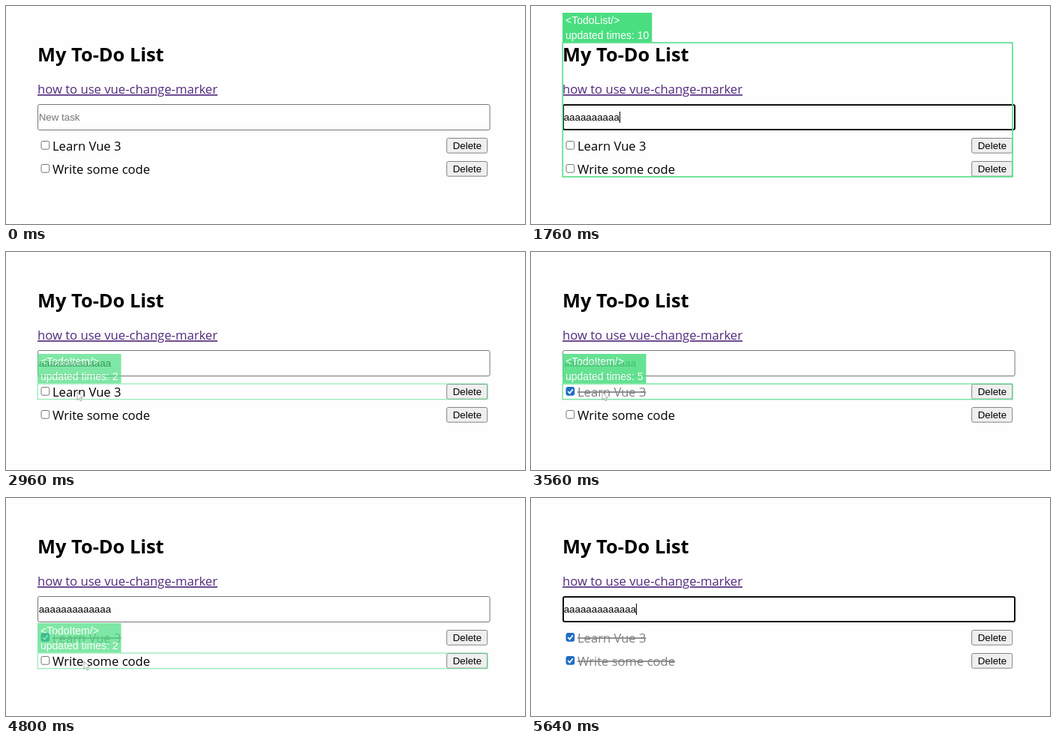
An HTML page for the animation above (6.04 s loop, 692x291 px).

```html
<!DOCTYPE html>
<html lang="en">
<head>
<meta charset="utf-8">
<title>My To-Do List</title>
<style>
  html, body { margin: 0; width: 100%; height: 100%; overflow: hidden; background: #fefefe; }
  svg { display: block; }
  text { font: 16.6px "Open Sans", sans-serif; white-space: pre; }
  .title { font-size: 25.4px; font-weight: 700; }
  .link { font-size: 16.65px; fill: #52297c; text-decoration: underline; }
  .control { font: 13.333px "Liberation Sans", Arial, sans-serif; }
  .button { fill: #efefef; stroke: #848484; }
  .box { fill: #fff; stroke: #767676; }
  .tick { fill: none; stroke: #fff; stroke-width: 1.8; }
  .done .box { fill: #1f6dc4; stroke: #1f6dc4; }
  .done .name { fill: #808080; text-decoration: line-through; }
  .item:not(.done) .tick { display: none; }
  .marker rect { fill: #4ade80; }
  .marker .outline { fill: none; stroke: #5fe08f; }
  .marker text { font: 14px "Liberation Sans", Arial, sans-serif; fill: #fff; }
</style>
</head>
<body>
<svg id="stage" width="692" height="291" viewBox="0 0 692 291">
  <text class="title" x="42" y="74">My To-Do List</text>
  <text class="link" x="42" y="117">how to use vue-change-marker</text>
  <rect id="field" fill="none" />
  <text id="value" class="control" x="43.7" y="153"></text>
  <rect id="caret" y="141" width="1" height="15" />
  <g id="items"></g>
  <g id="markers"></g>
  <path id="pointer" d="M0 0V10.5L2.6 8.2L4.4 12L6 11.2L4.3 7.6H7.4Z" fill="#fff" stroke="#999" stroke-width=".8" />
</svg>
<script>
const LOOP = 6040;
const $ = id => document.getElementById(id);
const clamp = v => Math.max(0, Math.min(1, v));

function setAttrs(el, attrs) {
  for (const key in attrs) el.setAttribute(key, attrs[key]);
}

function addGroup(parent, className, html) {
  const g = document.createElementNS("http://www.w3.org/2000/svg", "g");
  g.setAttribute("class", className);
  g.innerHTML = html;
  return $(parent).appendChild(g);
}

const addItem = (name, y) => addGroup("items", "item", `
  <rect class="box" x="47" y="${y + 4.5}" width="10.7" height="10.7" rx="2"/>
  <path class="tick" d="M49.2 ${y + 10}l2.4 2.6l4.2-5.4"/>
  <text class="name" x="62" y="${y + 17}">${name}</text>
  <rect class="button" x="587.7" y="${y + .5}" width="54" height="19.7" rx="2"/>
  <text class="control" x="595.7" y="${y + 15}">Delete</text>`);

const items = [addItem("Learn Vue 3", 176), addItem("Write some code", 207)];

function addMarker(component, y, height) {
  const g = addGroup("markers", "marker", `
    <rect class="outline" x="42.2" y="${y}" width="599.8" height="${height}"/>
    <rect class="label" x="42" y="${y - 40}" height="39.5"/>
    <text x="46" y="${y - 25}">&lt;${component}/&gt;</text>
    <text class="count" x="46" y="${y - 5}"></text>`);
  const [outline, label, , count] = g.children;
  return (updates, fade) => {
    g.style.display = updates && fade ? "" : "none";
    g.style.opacity = Math.min(1, .6 + .05 * updates) * fade;
    count.textContent = "updated times: " + updates;
    label.setAttribute("width", count.getComputedTextLength() + 8);
    outline.setAttribute("stroke-width", Math.min(1.7, 1 + .08 * updates));
  };
}

const markList = addMarker("TodoList", 49, 179);
const markItems = [addMarker("TodoItem", 176, 20.7), addMarker("TodoItem", 207, 20.7)];

// The first visible update brings two letters, each later key adds one.
const keyTimes = [800, 800, 880, 960, 1040, 1200, 1320, 1480, 1600, 1760, 1880, 2000, 2160];

const clicks = (t, start, interval, max) =>
  Math.max(0, Math.min(max, Math.floor((t - start) / interval) + 1));
const fadeOut = (t, from, to) => clamp((to - t) / (to - from));

// time, x, y
const route = [
  [80, 150, 222], [320, 120, 148], [2600, 120, 148], [2760, 95, 187], [4080, 95, 187],
  [4160, 105, 201], [4480, 104, 218], [5280, 104, 218], [5600, 125, 150]
];

function pointerAt(t) {
  const i = route.findIndex(p => p[0] > t);
  if (i < 1) return null;
  const [a, b] = [route[i - 1], route[i]];
  const k = (t - a[0]) / (b[0] - a[0]);
  return [a[1] + (b[1] - a[1]) * k, a[2] + (b[2] - a[2]) * k];
}

function drawField(t, typed) {
  const focused = t >= 320 && t < 2800 || t >= 5630;
  setAttrs($("field"), focused
    ? { x: 43, y: 132, width: 602, height: 33, rx: 2, stroke: "#101010", "stroke-width": 2 }
    : { x: 42.5, y: 131.5, width: 602.6, height: 34, rx: 2, stroke: "#767676", "stroke-width": 1 });
  const value = $("value");
  value.textContent = typed ? "a".repeat(typed) : "New task";
  value.setAttribute("fill", typed ? "#000" : "#757575");
  $("caret").style.display = focused ? "" : "none";
  $("caret").setAttribute("x", Math.round(43.7 + (typed ? value.getComputedTextLength() : 0)));
}

function draw(now) {
  const t = now % LOOP;
  const typed = keyTimes.filter(time => time <= t).length;
  drawField(t, typed);
  markList(typed, fadeOut(t, 2180, 2440));

  const counts = [clicks(t, 2800, 160, 9), clicks(t, 4660, 140, 5)];
  const fades = [fadeOut(t, 4280, 4520), fadeOut(t, 5320, 5620)];
  items.forEach((item, i) => {
    item.classList.toggle("done", counts[i] % 2 === 1);
    markItems[i](counts[i], fades[i]);
  });

  const spot = pointerAt(t);
  const visible = spot && spot[1] > 166;
  $("pointer").style.display = visible ? "" : "none";
  if (visible) $("pointer").setAttribute("transform", `translate(${spot})`);
  requestAnimationFrame(() => draw(performance.now()));
}

draw(performance.now());
</script>
</body>
</html>
```
